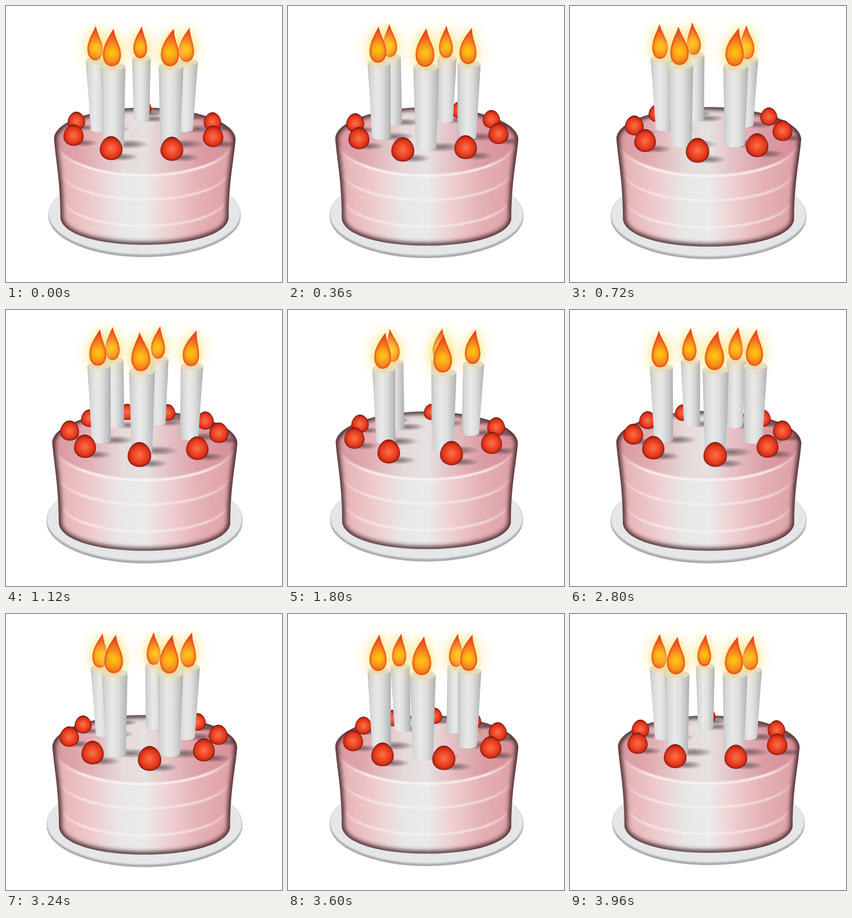
These frames come from a looping animation (512x512 px, 4000 ms). An HTML page with a canvas:

```html
<!DOCTYPE html>
<html lang="en">
<head>
<meta charset="utf-8">
<title>Birthday cake</title>
<style>
  html, body { margin: 0; width: 100%; height: 100%; overflow: hidden; background: #fff; }
  canvas { display: block; width: 100vw; height: 100vh; }
</style>
</head>
<body>
<canvas id="stage" width="512" height="512"></canvas>
<script>
const ctx = document.getElementById('stage').getContext('2d');
const STEP = 40, STEPS = 100, TURN = 99;
const CX = 256, RAD = Math.PI / 180;

// angle: degrees from the front; top: wick height; sway: flame tip offset at SWAY_AT
const SWAY_AT = [0, 18, 28, 45, 60, 81, 99];
const CANDLES = [
  { angle: -98, top: 102, sway: [-1, -5, 2, 4, 7, 2, -1] },
  { angle: -34, top: 102.5, sway: [1, -3, -2, 3, 0, 4, 1] },
  { angle: 35, top: 102.5, sway: [5, -4, 2, -7, 2, 5, 5] },
  { angle: 99, top: 105, sway: [4, 6, -4, 3, 3, -2, 4] },
  { angle: 181, top: 105.5, sway: [1, -3, 8, 0, -11, 3, 1] }
];
const CHERRIES = [18, 59, 99, 139, 180, 216, 259, 298, 338.5];

function gradient(g, stops) {
  stops.forEach(([at, color]) => g.addColorStop(at, color));
  return g;
}
const across = (x0, x1, stops) => gradient(ctx.createLinearGradient(x0, 0, x1, 0), stops);
const radial = (x, y, r, stops) => gradient(ctx.createRadialGradient(x, y, 0, x, y, r), stops);

function ellipse(x, y, rx, ry, fill) {
  ctx.beginPath();
  ctx.ellipse(x, y, rx, ry, 0, 0, Math.PI * 2);
  ctx.fillStyle = fill;
  ctx.fill();
}

function orbit(angle, radius, frame) {
  const a = (angle - 360 * frame / TURN) * RAD;
  return { x: radius * Math.sin(a), z: radius * Math.cos(a) };
}
const near = (z, k) => 1 / (1 - k * z);

function swayAt(values, frame) {
  let i = 0;
  while (i < SWAY_AT.length - 2 && frame >= SWAY_AT[i + 1]) i++;
  const u = (frame - SWAY_AT[i]) / (SWAY_AT[i + 1] - SWAY_AT[i]);
  return values[i] + (values[i + 1] - values[i]) * u * u * (3 - 2 * u);
}

function drawPlate() {
  ellipse(257, 390, 178.5, 76, '#acadae');
  ellipse(257, 386, 178.5, 76, '#cbcccd');
  ellipse(257, 385, 177, 75, '#e5e6e7');
}

const cakePath = new Path2D('M89 246C91 212 170 188.5 256 188.5C342 188.5 423 212 426 246' +
  'C423 285 413 325 413 394C408 425 340 443 257 443C175 443 106 425 101 394C101 325 92 285 89 246Z');

function drawCake() {
  ctx.save();
  ctx.fillStyle = across(89, 426, [[0, '#e0a8ac'], [0.08, '#e8b7ba'], [0.22, '#efcccd'],
    [0.36, '#e9e6e6'], [0.5, '#ebeaea'], [0.63, '#efd0d1'], [0.8, '#e4b0b4'], [0.94, '#e0a3a9'], [1, '#d3949b']]);
  ctx.fill(cakePath);
  ctx.clip(cakePath);

  ellipse(257, 250, 167, 64, across(89, 426, [[0, '#d9959d'], [0.18, '#e2acb1'], [0.38, '#e6dada'],
    [0.5, '#e6e1e1'], [0.62, '#e5c3c6'], [0.8, '#dc9da5'], [1, '#d78d97']]));

  ctx.filter = 'blur(0.8px)';
  ctx.lineWidth = 4.5;
  [[250, 164, 64, 0.8], [305, 156, 54, 0.5], [357, 151, 51, 0.5]].forEach(([y, rx, ry, alpha]) => {
    const white = a => `rgba(255,255,255,${alpha * a})`;
    ctx.strokeStyle = across(100, 414, [[0, white(0.3)], [0.15, white(1)],
      [0.45, white(0.7)], [0.85, white(1)], [1, white(0.3)]]);
    ctx.beginPath();
    ctx.ellipse(257, y, rx, ry, 0, 0.17, Math.PI - 0.17);
    ctx.stroke();
  });

  // soft dark rim inside the outline
  ctx.filter = 'blur(4.5px)';
  ctx.strokeStyle = 'rgba(42,18,22,.95)';
  ctx.lineWidth = 9;
  ctx.stroke(cakePath);
  ctx.restore();
}

function drawShadow(x, y, rx, ry) {
  ctx.save();
  ctx.translate(x, y);
  ctx.scale(rx, ry);
  ellipse(0, 0, 1, 1, radial(0, 0, 1, [[0, 'rgba(60,48,50,.58)'], [0.5, 'rgba(70,55,58,.34)'], [1, 'rgba(80,60,62,0)']]));
  ctx.restore();
}

function cherry(angle, frame) {
  const { x, z } = orbit(angle, 1, frame), s = near(z, 0.215);
  const px = CX + 133 * x * s, py = 220 + 37.5 * z * s;
  const r = 16.5 * s, h = 17.5 * s;
  return {
    z,
    shadow() { drawShadow(px + 16 * s, py + 13 * s, 25 * s, 6.5 * s); },
    draw() {
      ctx.save();
      ctx.translate(px, py);
      ctx.beginPath();
      ctx.moveTo(0, -h);
      ctx.bezierCurveTo(r * 0.54, -h, r, -h * 0.4, r, h * 0.14);
      ctx.bezierCurveTo(r, h * 0.64, r * 0.55, h, 0, h);
      ctx.bezierCurveTo(-r * 0.55, h, -r, h * 0.64, -r, h * 0.14);
      ctx.bezierCurveTo(-r, -h * 0.4, -r * 0.54, -h, 0, -h);
      ctx.fillStyle = radial(0, h * 0.04, h, [[0, '#f8754c'], [0.35, '#f25431'], [0.7, '#e5381d'], [0.87, '#c62814'], [1, '#851a0e']]);
      ctx.fill();
      ctx.strokeStyle = 'rgba(100,18,10,.7)';
      ctx.lineWidth = 1;
      ctx.stroke();
      ctx.restore();
    }
  };
}

function drawFlame(x, y, w, h, tip) {
  ctx.save();
  ctx.translate(x - 2, y);
  tip += 2;
  const lean = Math.max(-1, Math.min(1, tip / 8));
  ctx.beginPath();
  ctx.moveTo(0, 0);
  ctx.bezierCurveTo(w * 0.65, 0, w, -h * 0.14, w, -h * 0.31);
  ctx.bezierCurveTo(w, -h * 0.54, tip + w * 0.4 * (1 - lean), -h * 0.68, tip, -h);
  ctx.bezierCurveTo(tip - w * 0.4 * (1 + lean), -h * 0.78, -w, -h * 0.56, -w, -h * 0.31);
  ctx.bezierCurveTo(-w, -h * 0.14, -w * 0.6, 0, 0, 0);
  ctx.fillStyle = radial(0, -h * 0.36, h * 0.6, [[0, '#fec70e'], [0.18, '#fcb016'],
    [0.45, '#f5841f'], [0.75, '#ec5a20'], [1, '#e5471f']]);
  ctx.shadowColor = 'rgba(255,222,105,.75)';
  ctx.shadowBlur = 32;
  ctx.fill();
  ctx.shadowBlur = 14;
  ctx.fill();
  ctx.shadowBlur = 0;
  ctx.clip();
  ctx.filter = 'blur(1.5px)';
  ctx.strokeStyle = 'rgba(230,72,28,.75)';
  ctx.lineWidth = 5;
  ctx.stroke();
  ctx.restore();
}

function candle(spec, frame) {
  const place = orbit(spec.angle, 0.62, frame);
  const center = orbit(-90, 0.028, frame); // the ring of candles sits slightly off centre
  const x = place.x + center.x, z = place.z + center.z;
  const s = near(z, 0.227), ts = near(z, 0.25);
  const bx = CX + 131 * x * s, by = 232 + 42 * z * s;
  const tx = CX + 140 * x * near(z, 0.17), ty = spec.top + 16 * z * s;
  const br = 16.3 * s, tr = 20 * ts;
  return {
    z,
    shadow() { drawShadow(bx + 24 * s, by, 34 * s, 8 * s); },
    draw() {
      ctx.beginPath();
      ctx.moveTo(tx - tr, ty);
      ctx.lineTo(bx - br, by);
      ctx.ellipse(bx, by, br, br * 0.36, 0, Math.PI, 0, true);
      ctx.lineTo(tx + tr, ty);
      ctx.closePath();
      const left = Math.min(tx - tr, bx - br), right = Math.max(tx + tr, bx + br);
      ctx.fillStyle = across(left, right, [[0, '#bfc0c1'], [0.14, '#d6d7d8'], [0.4, '#e9e9ea'],
        [0.62, '#dedfdf'], [0.88, '#bfc0c1'], [1, '#abacad']]);
      ctx.fill();
      ellipse(tx, ty, tr, tr * 0.31, '#dddcd7');
      drawFlame(tx, ty, 14.6 * ts, 64 * near(z, 0.15), swayAt(spec.sway, frame));
    }
  };
}

function draw(frame) {
  const grow = 1 + 0.02 * Math.abs(Math.sin(2 * Math.PI * frame / TURN)) ** 1.5;
  ctx.setTransform(1, 0, 0, 1, 0, 0);
  ctx.fillStyle = '#fff';
  ctx.fillRect(0, 0, 512, 512);
  ctx.translate(256.5, 250);
  ctx.scale(grow, grow);
  ctx.translate(-256.5, -250);
  drawPlate();
  drawCake();
  const items = [
    ...CHERRIES.map(angle => cherry(angle, frame)),
    ...CANDLES.map(spec => candle(spec, frame))
  ].sort((a, b) => a.z - b.z);
  ctx.save();
  ctx.clip(cakePath);
  items.forEach(item => item.shadow());
  ctx.restore();
  items.forEach(item => item.draw());
}

const start = performance.now();
let shown = -1;
function tick() {
  const frame = Math.floor((performance.now() - start) / STEP) % STEPS;
  if (frame !== shown) draw(shown = frame);
  requestAnimationFrame(tick);
}
tick();
</script>
</body>
</html>
```
